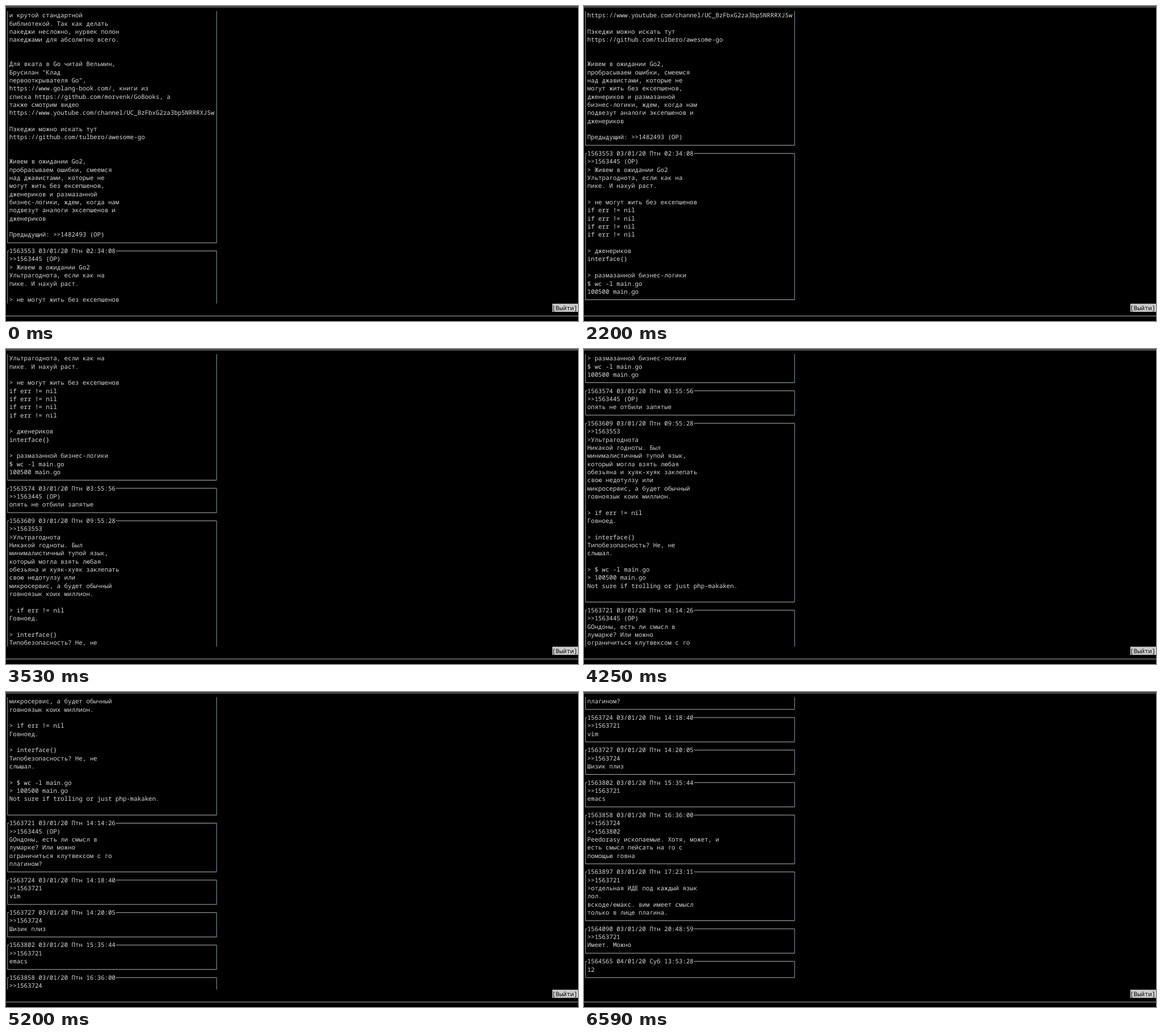
Write an HTML page that moves like this. It is 1007 px wide and 556 px high and loops after 6.66 s.

```html
<!DOCTYPE html>
<html lang="ru">
<head>
<meta charset="utf-8">
<title>Thread reader</title>
<style>
  html, body { margin: 0; width: 100%; height: 100%; overflow: hidden; background: #000; }
  svg { display: block; width: 1007px; height: 556px; }
  text {
    font: 10.758px "Noto Sans Mono", "DejaVu Sans Mono", monospace;
    fill: #dadada;
    white-space: pre;
    text-rendering: geometricPrecision;
  }
  .rule { stroke: #b4b8b6; }
  .left { stroke: #93afa9; }
  .right { stroke: #86a6b0; }
  .button { fill: #ccc; }
  .label { fill: #000; }
</style>
</head>
<body>
<svg id="stage" viewBox="0 0 1007 556">
  <clipPath id="pane"><rect x="0" y="8.9" width="1007" height="516.3"/></clipPath>
  <g clip-path="url(#pane)"><g id="thread"></g></g>
</svg>
<script>
const COL = 6.455, ROW = 14.343, TOP = 16.4;
const LEFT = 2.7, RIGHT = 370.8;
const LOOP = 6660, LINES_PER_STEP = 4;
const SCROLL_TIMES = [100, 780, 1510, 2230, 2620, 2930, 3240, 3530, 3780, 4010,
  4250, 4490, 4720, 4970, 5200, 5500, 5650, 5880, 6110, 6590];

// Posts are separated by "---"; each starts with its header line.
const THREAD = `
и крутой стандартной
библиотекой. Так как делать
пакеджи несложно, нурвек полон
пакеджами для абсолютно всего.


Для вката в Go читай Вельмин,
Брусилан "Клад
первооткрывателя Go",
https://www.golang-book.com/, книги из
списка https://github.com/morvenk/GoBooks, а
также смотрим видео
https://www.youtube.com/channel/UC_BzFbxG2za3bp5NRRRXJSw

Пэкеджи можно искать тут
https://github.com/tulbero/awesome-go


Живем в ожидании Go2,
пробрасываем ошибки, смеемся
над джавистами, которые не
могут жить без ексепшенов,
дженериков и размазанной
бизнес-логики, ждем, когда нам
подвезут аналоги эксепшенов и
дженериков

Предыдущий: >>1482493 (OP)
---
1563553 03/01/20 Птн 02:34:08
>>1563445 (OP)
> Живем в ожидании Go2
Ультрагоднота, если как на
пике. И нахуй раст.

> не могут жить без ексепшенов
if err != nil
if err != nil
if err != nil
if err != nil

> дженериков
interface{}

> размазанной бизнес-логики
$ wc -l main.go
100500 main.go
---
1563574 03/01/20 Птн 03:55:56
>>1563445 (OP)
опять не отбили запятые
---
1563609 03/01/20 Птн 09:55:28
>>1563553
>Ультрагоднота
Никакой годноты. Был
минималистичный тупой язык,
который могла взять любая
обезьяна и хуяк-хуяк заклепать
свою недотулзу или
микросервис, а будет обычный
говноязык коих миллион.

> if err != nil
Говноед.

> interface{}
Типобезопасность? Не, не
слышал.

> $ wc -l main.go
> 100500 main.go
Not sure if trolling or just php-makaken.

---
1563721 03/01/20 Птн 14:14:26
>>1563445 (OP)
GOндоны, есть ли смысл в
лумарке? Или можно
ограничиться клутвексом с го
плагином?
---
1563724 03/01/20 Птн 14:18:40
>>1563721
vim
---
1563727 03/01/20 Птн 14:20:05
>>1563724
Шизик плиз
---
1563802 03/01/20 Птн 15:35:44
>>1563721
emacs
---
1563858 03/01/20 Птн 16:36:00
>>1563724
>>1563802
Peedorasy ископаемые. Хотя, может, и
есть смысл пейсать на го с
помощью говна
---
1563897 03/01/20 Птн 17:23:11
>>1563721
>отдельная ИДЕ под каждый язык
лол.
вскоде/емакс. вим имеет смысл
только в лице плагина.
---
1564090 03/01/20 Птн 20:48:59
>>1563721
Имеет. Можно
---
1564565 04/01/20 Суб 13:53:28
12
`;

const stage = document.getElementById("stage");
const thread = document.getElementById("thread");

function add(parent, tag, attrs, content = "") {
  const node = document.createElementNS("http://www.w3.org/2000/svg", tag);
  for (const key in attrs) node.setAttribute(key, attrs[key]);
  node.textContent = content;
  parent.append(node);
}

const rowY = row => TOP + row * ROW;

const line = (parent, kind, x1, y1, x2, y2) =>
  add(parent, "line", { class: kind, x1, y1, x2, y2 });

const write = (parent, col, row, content, kind = "") =>
  add(parent, "text", { class: kind, x: col * COL - 0.7, y: rowY(row) + 3.8 }, content);

function drawPost(lines, firstRow) {
  const top = rowY(firstRow), bottom = rowY(firstRow + lines.length);
  line(thread, "rule", LEFT, top, COL - 1, top);
  line(thread, "rule", (1 + lines[0].length) * COL, top, RIGHT, top);
  line(thread, "rule", LEFT, bottom, RIGHT, bottom);
  line(thread, "left", LEFT, top, LEFT, bottom);
  line(thread, "right", RIGHT, top, RIGHT, bottom);
  lines.forEach((content, i) => content && write(thread, 1, firstRow + i, content));
}

// The first post's header lies one row above the pane.
let row = -1;
for (const post of THREAD.slice(0, -1).split("\n---\n")) {
  const lines = post.split("\n");
  drawPost(lines, row);
  row += lines.length + 1;
}

line(stage, "rule", 0, 1.7, 1007, 1.7);
line(stage, "rule", 0, 547.2, 1007, 547.2);
add(stage, "rect", { class: "button", x: 149 * COL, y: 525.5, width: 7 * COL + 1, height: ROW });
write(stage, 149, 36, "[Выйти]", "label");

function render(now) {
  const t = now % LOOP;
  const steps = SCROLL_TIMES.filter(time => time <= t).length;
  thread.setAttribute("transform", `translate(0 ${-steps * LINES_PER_STEP * ROW})`);
}

const start = performance.now();
function tick() {
  render(performance.now() - start);
  requestAnimationFrame(tick);
}
tick();
</script>
</body>
</html>
```
